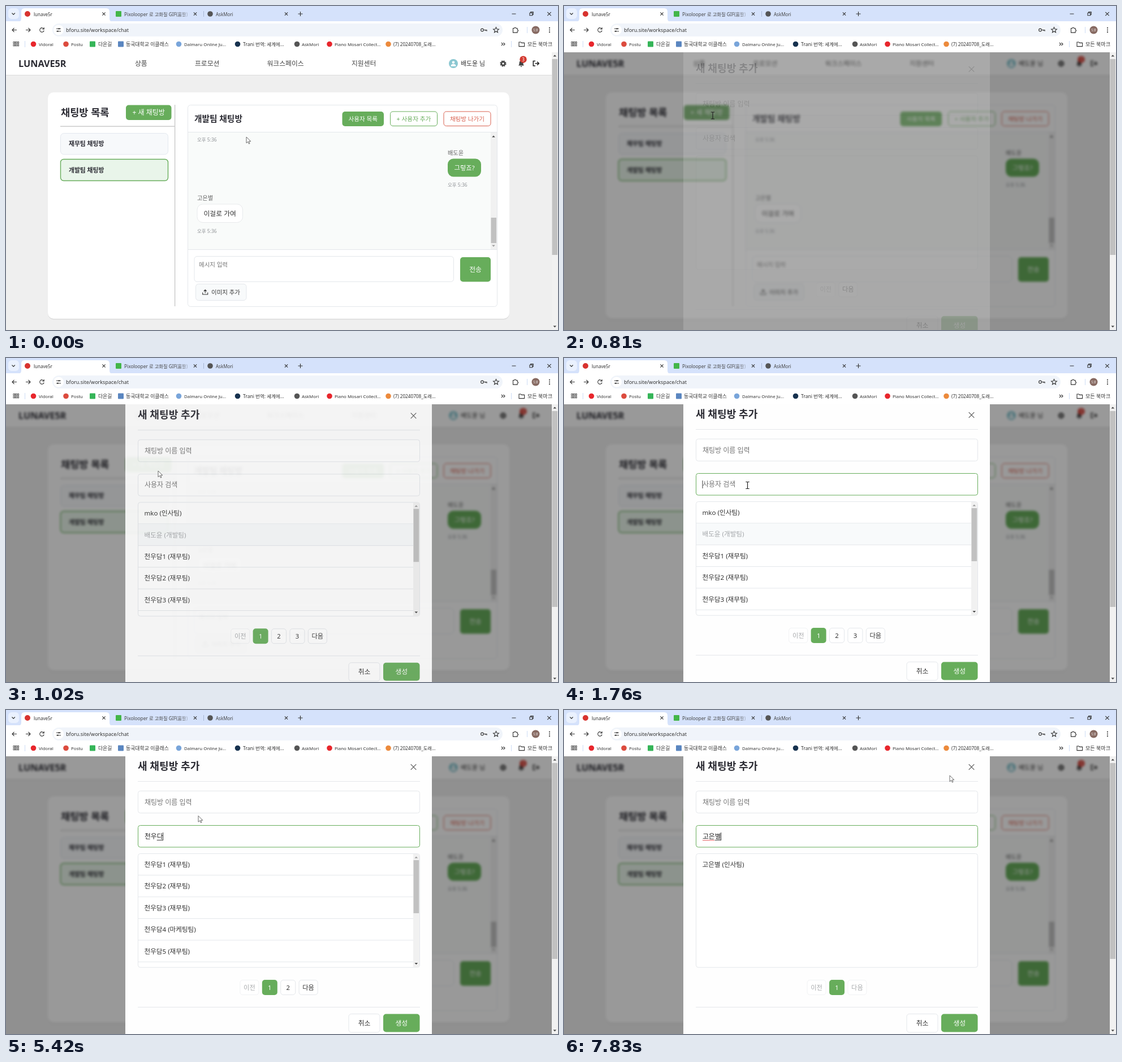
An HTML page for the animation above (8 s loop, 976 by 574 pixels).

```html
<!DOCTYPE html>
<html lang="ko">
<head>
<meta charset="utf-8">
<title>Chat room demo</title>
<style>
html, body { margin: 0; width: 100%; height: 100%; overflow: hidden; background: #fff; }
svg { display: block; width: 100vw; height: 100vh; }
text { font-family: "Noto Sans", "Noto Sans CJK KR", "Noto Sans CJK", sans-serif; }
.b { font-weight: 700; }
.m { text-anchor: middle; }
.i { fill: none; stroke: #333; stroke-width: 1.1; }
</style>
</head>
<body>
<svg id="stage" viewBox="0 0 976 574"></svg>
<script>
const GREEN = '#67ad5b', LINE = '#e4e7eb', INK = '#2b2b33', RED = '#d9604f';
const LOOP = 8000;

const rect = (x, y, w, h, r, fill, stroke = 'none', sw = 1) =>
  `<rect x="${x}" y="${y}" width="${w}" height="${h}" rx="${r}" fill="${fill}" stroke="${stroke}" stroke-width="${sw}"/>`;
const circle = (x, y, r, fill) => `<circle cx="${x}" cy="${y}" r="${r}" fill="${fill}"/>`;
const path = (d, extra = 'class="i"') => `<path d="${d}" ${extra}/>`;
const text = (x, y, size, str, fill = '#333', cls = '') =>
  `<text x="${x}" y="${y}" font-size="${size}" fill="${fill}" class="${cls}">${str}</text>`;
// The given box is the outer edge, border included.
const button = (x, y, w, h, size, str, fill, color, stroke) =>
  (stroke ? rect(x + 0.5, y + 0.5, w - 1, h - 1, 4.5, fill, stroke) : rect(x, y, w, h, 5, fill)) +
  text(x + w / 2, y + h / 2 + size * 0.37, size, str, color, 'm');
const cross = (x, y, r, extra) => path(`M${x - r} ${y - r}l${2 * r} ${2 * r}m0 ${-2 * r}l${-2 * r} ${2 * r}`, extra);
const triangle = (x, y, dir, fill) => path(`M${x - 2.8} ${y + 1.5 * dir}h5.6l-2.8 ${-3 * dir}z`, `fill="${fill}"`);
const hline = (x1, x2, y, color = LINE, w = 1) => path(`M${x1} ${y}H${x2}`, `stroke="${color}" stroke-width="${w}"`);

function tabStrip() {
  return rect(0, 0, 976, 28, 0, '#d5e2fb') + rect(4, 4, 19, 19, 6, '#eaf1fe') +
    path('M10.5 12.5l2.7 2.7 2.7-2.7') +
    path('M21 28q6 0 6-6V10q0-6 6-6H177q6 0 6 6V22q0 6 6 6z', 'fill="#fff"') +
    circle(38, 14, 5, '#d8332f') + text(49, 17.5, 8, 'lunave5r') +
    rect(194, 9, 10, 10, 1, '#43b649') + text(209, 17.5, 8.3, 'Pixolooper 로 고화질 GIF(움짤)', '#444') +
    rect(306, 6, 22, 18, 0, 'url(#fade)') + rect(327, 6, 14, 18, 0, '#d5e2fb') +
    circle(361, 14, 4.8, '#555') + text(371, 17.5, 8, 'AskMori', '#444') +
    [173, 334.5, 495.5].map(x => cross(x, 14, 2.6)).join('') +
    path('M349.5 9v10', 'stroke="#a9b7d4"') + path('M516.5 14h8m-4-4v8') +
    path('M894.5 14h7M926 12.2h4.6v4.6h-4.6zM927.6 12v-1.4h4.6v4.6h-1.4') + cross(960.5, 14, 3.2);
}

function toolbar() {
  return rect(0, 27, 976, 55, 0, '#fff') + rect(82, 31, 796, 23, 11.5, '#f0f4fa') + circle(93, 42.5, 9, '#fff') +
    path('M19 42.5h-8m3.5-3.5l-3.5 3.5 3.5 3.5') +
    path('M35 42.5h8m-3.5-3.5l3.5 3.5-3.5 3.5') +
    path('M66.8 40.5a3.8 3.8 0 1 0 .4 3M67.2 38v3h-3') +
    path('M89 40.3h3.4m2.4 0h2.2M89 44.8h2m2.4 0h3.6') +
    circle(93.7, 40.3, 1.3, '#333') + circle(91.7, 44.8, 1.3, '#333') +
    text(106, 45.8, 9, 'bforu.site/workspace/chat') +
    path('M844.5 42.5h5.5v2.2m-2-2v1.6') + `<circle cx="842" cy="42.5" r="2.4" class="i"/>` +
    path('M866.5 37.6l1.4 3.2 3.5.3-2.7 2.3.8 3.4-3-1.8-3 1.8.8-3.4-2.7-2.3 3.5-.3z') +
    path('M896.5 39.5h2.2a1.5 1.5 0 0 1 3 0h2.4v2.6a1.5 1.5 0 0 1 0 3v2h-7.6z') +
    path('M921.5 37v11', 'stroke="#cddcf5"') + circle(936.5, 42.5, 7, '#876a62') +
    text(936.5, 44.4, 5, '도윤', '#fff', 'm') +
    [38.8, 42.5, 46.2].map(y => circle(961, y, 1.1, '#333')).join('');
}

function bookmarks() {
  const items = [
    [58, 7.8, 'Vidoral', '#e8262c', 48.5], [115, 7.8, 'Postu', '#dc4b3e', 106], [163, 8.8, '다온길', '#35b558', 153],
    [212, 8.9, '동국대학교 이클래스', '#5a86c0', 203], [315, 7.9, 'Dalmaru Online Ju...', '#79a5da', 305.5],
    [419, 8.5, 'Trani 번역: 세계에...', '#17324f', 409.5], [523, 7.9, 'AskMori', '#555', 514.5],
    [581, 7.9, 'Piano Mosari Collect...', '#e8262c', 572], [685, 8.2, '(7) 20240708_도래...', '#ec8a3c', 676]];
  const grid = [0, 1, 2].flatMap(c => [0, 1].map(r => rect(13 + c * 3.6, 63.5 + r * 4.5, 2.4, 2.8, 0, 'none', '#444', 0.9)));
  return grid.join('') + path('M33.5 62v11', 'stroke="#cddcf5"') +
    items.map(([x, size, str, color, ix], i) =>
      (i === 2 || i === 3 ? rect(ix - 5, 62.5, 10, 10, 1, color) : circle(ix, 67.5, 4.8, color)) + text(x, 70.5, size, str)).join('') +
    path('M876 65l2.5 2.5-2.5 2.5m3.5-5l2.5 2.5-2.5 2.5') + path('M893.5 62v11', 'stroke="#cddcf5"') +
    path('M907 64h3.4l1.2 1.4h5v6.2h-9.6z') + text(922, 70.7, 9.05, '모든 북마크');
}

function header() {
  return rect(-20, 60, 1010, 62, 0, '#fff') + hline(-20, 990, 122.5, '#dcdcdc', 1.2) +
    text(22, 108, 16.2, 'LUNAVE5R', INK, 'b') +
    [[228, '상품'], [334, '프로모션'], [461.5, '워크스페이스'], [611, '지원센터']].map(([x, s]) => text(x, 106, 11.8, s, '#444')).join('') +
    circle(791, 102, 8, '#8bc7d1') + circle(791, 99.8, 2.3, '#fff') + path('M786.5 106.8q0-4 4.5-4t4.5 4z', 'fill="#fff"') +
    text(804, 105.5, 10.9, '배도윤 님') +
    `<circle cx="879" cy="102" r="3.1" fill="none" stroke="#444" stroke-width="2.6"/>` +
    `<circle cx="879" cy="102" r="4.8" fill="none" stroke="#444" stroke-width="1.6" stroke-dasharray="2.2 1.57"/>` +
    path('M906 105.5q1.6-1.5 1.6-4.5 0-4 3.4-4t3.4 4q0 3 1.6 4.5zM909.5 106.5h3q-.3 1.6-1.5 1.6t-1.5-1.6z', 'fill="#444"') +
    circle(914.5, 94.7, 6.2, '#d3392f') + text(914.5, 97.5, 8, '3', '#fff', 'm') +
    path('M936 97.5h-3.7v8.5h3.7M935.5 101.8h6.5m-2.8-3l3 3-3 3', 'fill="none" stroke="#222" stroke-width="1.6"');
}

function page(hover) {
  const stamp = (x, y) => text(x, y, 8.5, '오후 5:36', '#8f9296');
  return rect(-20, 60, 1010, 540, 0, '#efefef') + header() +
    rect(74, 154.5, 816, 401, 10, '#dcdcdc') + rect(74, 153, 816, 401, 10, '#fff') +
    text(97, 194.5, 17.6, '채팅방 목록', INK, 'b') +
    button(212, 175.5, 80.5, 26.5, 12, '+ 새 채팅방', hover ? '#59994e' : GREEN, '#fff') +
    hline(96, 298, 213.3, '#cccccc', 1.6) + path('M298.6 175V532', 'stroke="#c9c9c9" stroke-width="1.4"') +
    rect(96.5, 225.5, 190, 37.5, 6, '#f7f9fb', '#e3e8ef') + text(111, 248, 10.8, '재무팀 채팅방', INK, 'b') +
    rect(96.5, 271.5, 190, 38, 5.5, '#e9f5ea', GREEN, 1.4) + text(111, 294.5, 10.8, '개발팀 채팅방', INK, 'b') +
    rect(321.5, 175.5, 547, 357, 5, '#fff', LINE) + rect(322, 224, 546, 207, 0, '#f9fbfa') +
    hline(322, 868, 223.5) + hline(322, 868, 431.5) + text(333, 205, 14.7, '개발팀 채팅방', INK, 'b') +
    button(594.5, 187, 73.5, 26, 10.6, '사용자 목록', GREEN, '#fff') +
    button(679, 186.5, 84, 26.5, 10.7, '+ 사용자 추가', '#fff', GREEN, GREEN) +
    button(773.5, 186.5, 84, 26.5, 10.6, '채팅방 나가기', '#fff', RED, RED) +
    stamp(338, 240) + text(781, 264, 10.2, '배도윤', '#666') +
    rect(781, 270.5, 59, 32, 10, GREEN) + text(792.5, 290.5, 11.3, '그렇죠?', '#fff') + stamp(781, 320) +
    text(338, 344, 10.2, '고은별', '#666') + rect(338, 351, 80.5, 32.5, 10, '#fff', '#e8eaec') +
    text(349.5, 371.5, 11.8, '이걸로 가여') + stamp(338, 402) +
    rect(857, 224, 11, 207, 0, '#f1f1f1') + rect(857.5, 375, 9.5, 45, 0, '#c1c1c1') +
    triangle(862, 231, 1, '#444') + triangle(862, 425, -1, '#999') +
    rect(333, 443.5, 458.5, 45, 5, '#fff', LINE) + text(341, 462, 10.5, '메시지 입력', '#757575') +
    button(803, 445, 54, 43.5, 11.8, '전송', GREEN, '#fff') +
    rect(335.5, 492.5, 89.5, 29, 5, '#f8fafb', LINE) + text(363, 510.5, 10.5, '이미지 추가') +
    path('M347.7 507.5v3.5h9v-3.5M352.2 508.5v-5.5m-2.6 2.4l2.6-2.6 2.6 2.6');
}

function scrollbar() {
  return rect(965, 82, 11, 492, 0, '#f1f1f1') + rect(965.5, 94, 9.5, 347, 0, '#c1c1c1') +
    triangle(970.3, 88, 1, '#444') + triangle(970.3, 568, -1, '#444');
}

function modal() {
  return rect(211, 40, 542, 620, 0, '#fefefe') + text(233, 106, 18.1, '새 채팅방 추가', INK, 'b') +
    cross(720.5, 101, 4.8, 'class="i" style="stroke:#555"') + hline(233, 732, 126.5) +
    rect(233.5, 143.5, 498, 39, 4, '#fff', LINE) + text(245, 167.5, 12, '채팅방 이름 입력', '#757575') +
    `<rect id="search" x="233.5" y="204.5" width="498" height="38.5" rx="4" fill="#fff"/>` +
    `<text id="query" x="245" y="228.2"/><path id="marks" fill="none" stroke="#222" stroke-width=".9"/>` +
    `<path id="squiggle" fill="none" stroke="#d33" stroke-width=".9"/>` +
    `<g id="results"></g>` + hline(233, 732, 526.5) +
    button(605.5, 538, 56, 33.5, 11.8, '취소', '#fff', '#333', LINE) +
    button(667, 538.5, 64.5, 32, 11.8, '생성', GREEN, '#fff');
}

// Result list with its pager; pages 0 means still loading.
function results({ rows, pages }) {
  const step = 38.4, full = rows.length > 1;
  let out = rect(233.5, 254.5, 498, 201.5, 4, '#fff', LINE);
  rows.forEach(([name, team], i) => {
    const y = 254.5 + i * step, off = name === '배도윤';
    if (off) out += rect(234, y, 486, step, 0, '#f8fafb');
    out += text(244.5, y + 23.5, 11.6, `${name} (${team})`, off ? '#a4a7aa' : '#333');
    if (full) out += hline(234, 720, y + step - 0.3);
  });
  if (full) out += rect(720, 255, 11, 200.5, 0, '#f1f1f1') + rect(720.5, 266, 9.7, 94, 0, '#c1c1c1') +
    triangle(725.3, 261, 1, '#999') + triangle(725.3, 449.5, -1, '#444');
  let x = 482.5 - (68 + 27 * pages + 5.4 * (pages + 1)) / 2;
  const put = (w, label, fill, color, stroke) => {
    out += button(x, 478, w, 27, 11.2, label, fill, color, stroke);
    x += w + 5.4;
  };
  const step2 = (label, off) => put(34, label, '#fff', off ? '#a9abad' : '#333', off ? '#f1f2f4' : LINE);
  step2('이전', true);
  for (let n = 1; n <= pages; n++) n === 1 ? put(27, n, GREEN, '#fff') : put(27, n, '#fff', '#333', LINE);
  step2('다음', pages === 1);
  return out;
}

const numbered = n => ['천우담' + n, n === 4 ? '마케팅팀' : '재무팀'];
const everyone = { rows: [['mko', '인사팀'], ['배도윤', '개발팀'], ...[1, 2, 3].map(numbered)], pages: 3 };
const lists = [[0, { rows: [], pages: 0 }], [880, everyone], [3620, { rows: [1, 2, 3, 4, 5].map(numbered), pages: 2 }],
  [5890, everyone], [6630, { rows: [['고은별', '인사팀']], pages: 1 }]];
const typing = [[1690, ''], [3090, 'ㅊ'], [3350, '처'], [3550, '천'], [3820, '천ㅇ'], [3960, '천우'], [4160, '천우ㄷ'],
  [4690, '천우다'], [5220, '천우다'], [5560, '천우ㄷ'], [5620, '천우'], [5690, '천'], [5820, ''], [6020, 'ㄱ'], [6220, '고'],
  [6360, '고ㅇ'], [6500, '고은'], [6630, '고은벼'], [6770, '고은별']];
const moves = [[0, 425, 232, 'arrow'], [200, 370, 217, 'arrow'], [270, 290, 196, 'hand'], [340, 257, 183, 'hand'],
  [480, 257, 184, 'hand'], [810, 263, 194, 'beam'], [950, 266, 197, 'arrow'], [1020, 269, 200, 'arrow'],
  [1490, 278, 207, 'beam'], [1560, 297, 218, 'beam'], [1690, 318, 224, 'beam'], [1760, 324.5, 225.5, 'beam'],
  [2020, 333, 225, 'beam'], [2220, 342, 225, 'beam'], [2420, 341, 204, 'arrow'], [2550, 338, 197, 'arrow'],
  [5220, 340, 187.5, 'arrow'], [5560, 343, 181, 'arrow'], [5760, 345, 174, 'arrow'], [6020, 346, 171, 'arrow'],
  [7170, 347, 173, 'arrow'], [7300, 348, 176, 'arrow'], [7630, 470, 158, 'arrow'], [7700, 590, 134, 'arrow'],
  [7830, 682, 116, 'arrow']];

const pointers = {
  arrow: path('M0 0V10.8L2.6 8.4 4.4 12.2 6 11.5 4.3 7.8H7.8Z', 'fill="#fff" stroke="#444" stroke-width=".8"'),
  hand: path('M3.5 8V1.4q0-1.2 1-1.2t1 1.2V6l4.8 1q1.2.3 1 1.6l-.7 4.2-1 2H5L1 9.6q-.6-1.3.8-1.4z',
    'fill="#fff" stroke="#333" stroke-width=".8"'),
  beam: path('M-3.2 -6h2.4l.8.7.8-.7h2.4M0 -5.3V5.3M-3.2 6h2.4l.8-.7.8.7h2.4', 'fill="none" stroke="#222" stroke-width="1.2"')
};

const $ = id => document.getElementById(id);
$('stage').innerHTML =
  `<defs><clipPath id="view"><rect y="82" width="965" height="492"/></clipPath>
   <linearGradient id="fade"><stop stop-color="#d5e2fb" stop-opacity="0"/><stop offset="1" stop-color="#d5e2fb"/></linearGradient></defs>` +
  tabStrip() + toolbar() + bookmarks() +
  `<g clip-path="url(#view)"><g id="page"></g><rect id="shade" y="82" width="965" height="492"/><g id="modal">${modal()}</g></g>` +
  scrollbar() + '<g id="pointer"></g>';

const clamp = v => Math.min(1, Math.max(0, v));
const at = (track, t) => track.filter(k => k[0] <= t).pop();
const shown = {};
function swap(id, key, make) {
  if (shown[id] === key) return;
  shown[id] = key;
  $(id).innerHTML = make();
}

function drawQuery(t) {
  const key = at(typing, t), query = $('query');
  const str = key ? key[1] : '', empty = !str;
  $('search').setAttribute('stroke', key ? GREEN : LINE);
  query.setAttribute('font-size', empty ? 12 : 11.8);
  query.setAttribute('fill', empty ? '#757575' : '#222');
  query.textContent = str || '사용자 검색';
  const end = 245 + (empty ? 0 : query.getComputedTextLength());
  const last = empty ? end : 245 + (end - 245) * (str.length - 1) / str.length;
  const caret = key && Math.floor((t - key[0]) / 530) % 2 === 0;
  $('marks').setAttribute('d', (empty ? '' : `M${last} 230.6H${end}`) + (caret ? `M${end} 217V231` : ''));
  $('squiggle').setAttribute('d', t < 7170 ? '' : 'M245 230' + 'l1.5 1.5 1.5-1.5'.repeat(Math.round((last - 245) / 3)));
}

function draw(t) {
  const frame = 740 + 70 * Math.floor((t - 740) / 70);
  const shade = t < 740 ? 0 : clamp((frame - 705) / 105);
  const enter = t < 740 ? 0 : clamp((frame - 763) / 285);
  const hover = t >= 270 && t < 880;
  swap('page', hover, () => page(hover));
  $('page').style.filter = shade ? `blur(${2 * shade}px)` : 'none';
  $('shade').setAttribute('fill-opacity', 0.4 * shade);
  $('modal').setAttribute('opacity', enter);
  $('modal').setAttribute('transform', `translate(0 ${13 * (1 - enter)})`);
  const list = at(lists, t);
  swap('results', list[0], () => results(list[1]));
  drawQuery(t);
  const [, x, y, kind] = at(moves, t);
  swap('pointer', kind, () => pointers[kind]);
  $('pointer').setAttribute('transform', `translate(${x} ${y})`);
}

const start = performance.now();
function tick() {
  draw((performance.now() - start) % LOOP);
  requestAnimationFrame(tick);
}
tick();
</script>
</body>
</html>
```
